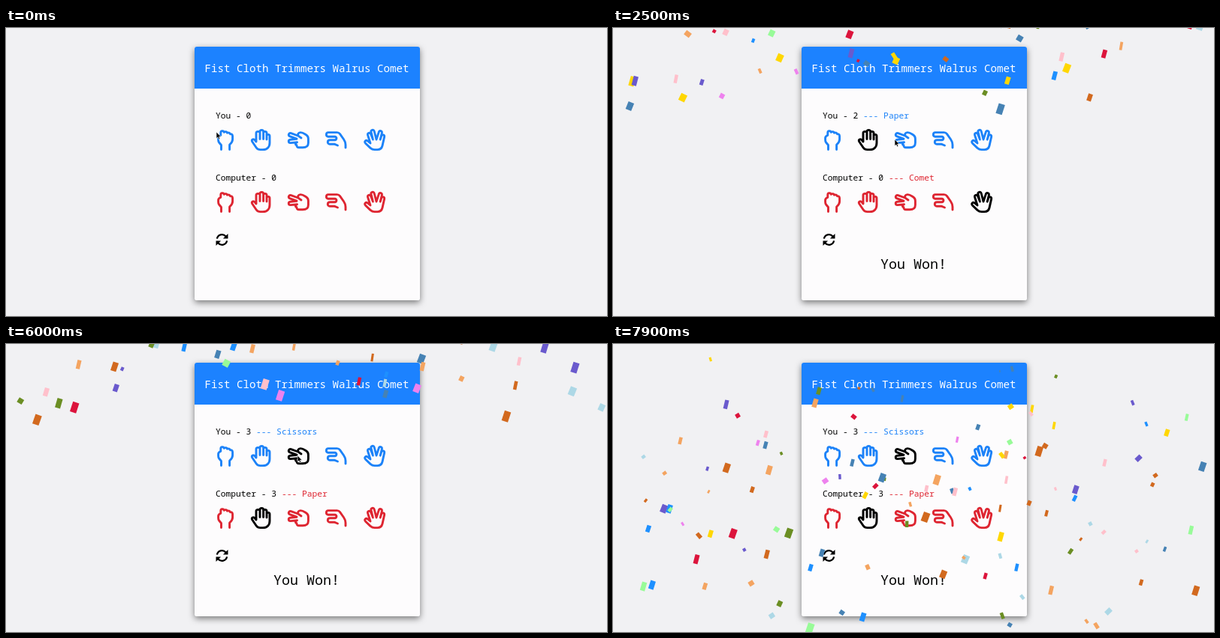
These frames come from a looping animation (800x385 px, 8000 ms). An HTML page with a canvas:

```html
<!DOCTYPE html>
<html lang="en">
<head>
<meta charset="utf-8">
<title>Hand game</title>
<style>
  html, body { margin: 0; width: 100%; height: 100%; overflow: hidden; background: #f1f1f3; }
  #card {
    position: absolute; left: 250.5px; top: 24.5px; width: 300px; height: 339.5px;
    border-radius: 3px; overflow: hidden; background: #fdfcfd;
  }
  #shadow {
    position: absolute; left: 250.5px; top: 24.5px; width: 300px; height: 339.5px;
    border-radius: 3px; box-shadow: 0 3px 8px rgba(0, 0, 0, .5);
  }
  #head { height: 56.5px; background: #1c82ff; }
  svg, canvas { position: absolute; left: 0; top: 0; width: 800px; height: 385px; }
  text { font: 11.28px "Noto Sans Mono", "DejaVu Sans Mono", monospace; white-space: pre; }
  #title { font-size: 14.17px; fill: #fff; text-anchor: middle; font-weight: 500; }
  #result { font-size: 18.35px; text-anchor: middle; }
  .icon { fill: none; stroke-width: 2.9; stroke-linecap: round; stroke-linejoin: round; }
</style>
</head>
<body>
<div id="shadow"></div>
<div id="card"><div id="head"></div></div>
<svg id="game" viewBox="0 0 800 385">
  <text id="title" x="400.5" y="58.5">Fist Cloth Trimmers Walrus Comet</text>
  <g id="rows"></g>
  <g id="refresh" transform="translate(287.5 283)">
    <g fill="none" stroke="#000" stroke-width="2.3">
      <path d="M-6.6 -1.4 A6.6 6.6 0 0 1 5 -4.4"/>
      <path d="M6.6 1.4 A6.6 6.6 0 0 1 -5 4.4"/>
    </g>
    <path d="M8 -8 V-1.4 H1.4 Z M-8 8 V1.4 H-1.4 Z"/>
  </g>
  <text id="result" x="400" y="322"></text>
</svg>
<canvas id="confetti" width="800" height="385"></canvas>
<svg viewBox="0 0 800 385">
  <circle id="ring" cx="390" cy="150" r="13" fill="none" stroke="#000" stroke-width="1.5"/>
  <path id="cursor" d="M0 0 V8.6 L2 6.9 L3.3 9.8 L4.8 9.1 L3.5 6.3 H6.1 Z" stroke="#fff" stroke-width=".6"/>
</svg>
<script>
const LOOP = 8000, STEP = 100, W = 800, H = 385;
const BLUE = '#1c82f8', RED = '#de2531';
const $ = id => document.getElementById(id);

const hands = [
  { name: 'Rock', x: 281, y: 136, d: 'M5.5 26.5 V20.5 L2.6 17 C1.8 16 1.6 15 1.6 13.5 V11 C1.6 9.5 2.5 8.3 4.8 7.5 V4 C4.8 1 8.8 .8 9.2 3.4 C10.8 2 13 2.6 13.5 4.2 C15 3.4 17 4 17.4 5.8 C19 5.4 20.6 6.4 20.6 8.4 V13 C20.6 16 19.5 17.5 16.6 20 V26.5' },
  { name: 'Paper', x: 326, y: 135, d: 'M7 17 L5 14.6 C3.3 12.6 .3 14.4 1.8 17 L7.2 25 C8.6 27 10.4 27.6 12.4 27.6 H16 C21.5 27.6 25 24 25 18.5 V9.5 C25 6.6 21 6.6 21 9.5 V5.5 C21 2.6 16.6 2.6 16.6 5.5 V3.6 C16.6 .6 12 .6 12 3.6 V5.5 C12 2.6 7 2.6 7 5.5 Z M12 5 V13.5 M16.6 5 V13.5 M21 9 V14' },
  { name: 'Scissors', x: 375, y: 138, d: 'M13.5 6 L4.4 2.6 C1.3 1.6 0 5.6 3 6.8 L12 10.2 L3.6 11.2 C.2 11.6 .6 15.9 4 15.6 L12.5 14.8 C9.8 15.4 10 18.2 12 18.6 C11.6 20.8 13 21.8 15 21.8 H20 C25 21.8 27.4 19.5 27.4 15.5 V10 C27.4 7.6 26.4 6 24.4 4.8 C22 3.2 20 1.6 17 1.6 C14 1.6 12.5 4.6 14.6 6.6 L18 9' },
  { name: 'Lizard', x: 425, y: 138, d: 'M27 22 V18 C27 15 26 13 24.5 10.8 L19.5 3.6 C18.5 2.2 17.5 1.6 15.6 1.6 H4 C.6 1.6 .6 6.6 3.4 7.2 H12.5 C16 7.2 15.5 11.6 12.4 11.8 H6.5 C2.2 11.8 2.4 17.2 6 17.2 H12 L16.5 19' },
  { name: 'Comet', x: 477, y: 135, d: 'M8 19 L4.4 16 C2 14 -.6 17 1.6 19.2 L8 25.4 C9.8 27 11.4 27.6 13.6 27.6 H17.5 C21 27.6 23.2 25.8 24 22.4 L26.6 10.6 C27.2 7.6 23.4 6.8 22.6 9.6 L21.2 14.2 L23.4 5.4 C24.2 2.2 20 1.4 19.2 4.4 L16 14 L13.2 3 C12.4 0 8.2 1.2 9 4.2 L11.4 14 L8.6 6.8 C7.6 4 3.8 5.2 4.6 8.2 Z' }
];

// Each round: start time, both picks, both scores, outcome.
const rounds = [
  { at: 0, you: -1, cpu: -1, score: [0, 0], text: '' },
  { at: 300, you: 0, cpu: 3, score: [1, 0], text: 'You Won!', end: 2000 },
  { at: 2000, you: 1, cpu: 4, score: [2, 0], text: 'You Won!', end: 3200 },
  { at: 3200, you: 2, cpu: 4, score: [2, 1], text: 'You Lost!' },
  { at: 3600, you: 2, cpu: 0, score: [2, 2], text: 'You Lost!' },
  { at: 4700, you: 2, cpu: 4, score: [2, 3], text: 'You Lost!' },
  { at: 5600, you: 2, cpu: 1, score: [3, 3], text: 'You Won!', end: 7600 }
];
const clicks = [3500, 4600, 5500];

// Cursor stops: time, x, y.
const stops = [[0, 280, 139], [200, 290, 147], [700, 290, 147], [1400, 338, 153],
  [2100, 338, 153], [2500, 375, 149], [3000, 388, 149], [6500, 388, 149]];

function add(parent, tag, attrs) {
  const el = document.createElementNS('http://www.w3.org/2000/svg', tag);
  for (const k in attrs) el.setAttribute(k, attrs[k]);
  return parent.appendChild(el);
}

function makeRow(label, color, dy) {
  const text = add($('rows'), 'text', { x: 279, y: 121.3 + dy });
  const score = add(text, 'tspan', {});
  const pick = add(text, 'tspan', { fill: color });
  const icons = hands.map(h => add($('rows'), 'path', {
    class: 'icon', d: h.d, transform: `translate(${h.x} ${h.y + dy})`
  }));
  return (points, chosen) => {
    score.textContent = `${label} - ${points}`;
    pick.textContent = chosen < 0 ? '' : ` --- ${hands[chosen].name}`;
    icons.forEach((el, i) => el.setAttribute('stroke', i === chosen ? '#000' : color));
  };
}
const showYou = makeRow('You', BLUE, 0);
const showCpu = makeRow('Computer', RED, 83);

function seeded(seed) {
  return () => {
    seed = (seed + 0x6D2B79F5) | 0;
    let v = Math.imul(seed ^ (seed >>> 15), 1 | seed);
    v = (v + Math.imul(v ^ (v >>> 7), 61 | v)) ^ v;
    return ((v ^ (v >>> 14)) >>> 0) / 4294967296;
  };
}

const colors = ['dodgerblue', 'olivedrab', 'gold', 'pink', 'slateblue', 'lightblue',
  'violet', 'palegreen', 'steelblue', 'sandybrown', 'chocolate', 'crimson'];
const SCALE = .6, RATE = .045, COUNT = 150;

function makePieces(seed) {
  const rnd = seeded(seed);
  return Array.from({ length: COUNT }, () => ({
    color: colors[Math.floor(rnd() * colors.length)],
    x: rnd() * W,
    y: rnd() * H - H,
    size: rnd() * 10 + 5,
    spin: rnd() * .07 + .05
  }));
}
rounds.forEach((r, i) => { if (r.end) r.pieces = makePieces(i * 97 + 5); });

const ctx = $('confetti').getContext('2d');

const fall = (p, n) => p.y + SCALE * .5 * (100 * Math.sin(.01 * n) + (p.size + 2) * n);

function drawConfetti(round, t) {
  ctx.clearRect(0, 0, W, H);
  if (!round.pieces) return;
  const n = (t - round.at) * RATE;
  const last = (round.end - round.at) * RATE;
  for (const p of round.pieces) {
    if (n > last && fall(p, last) < -9) continue;
    const y = fall(p, n);
    if (y < -20 || y > H + 20) continue;
    const tilt = Math.sin(p.spin * n / .75) * 15 * SCALE;
    const size = p.size * SCALE;
    const x = p.x + SCALE * 100 * (1 - Math.cos(.01 * n)) + tilt;
    ctx.strokeStyle = p.color;
    ctx.lineWidth = size;
    ctx.beginPath();
    ctx.moveTo(x + size / 2, y);
    ctx.lineTo(x, y + tilt + size / 2);
    ctx.stroke();
  }
}

function moveCursor(t) {
  const i = stops.findIndex(s => s[0] > t);
  $('cursor').style.display = i < 0 ? 'none' : '';
  if (i < 0) return;
  const [a, b] = [stops[i - 1], stops[i]];
  const u = (t - a[0]) / (b[0] - a[0]);
  const k = u * u * (3 - 2 * u);
  const at = j => a[j] + (b[j] - a[j]) * k;
  $('cursor').setAttribute('transform', `translate(${at(1)} ${at(2)})`);
}

function draw(t) {
  const round = rounds.filter(r => r.at <= t).pop();
  showYou(round.score[0], round.you);
  showCpu(round.score[1], round.cpu);
  $('result').textContent = round.text;
  $('ring').style.display = clicks.includes(t) ? '' : 'none';
  drawConfetti(round, t);
  moveCursor(t);
}

const begin = performance.now();
let shown = -1;
function tick() {
  const t = Math.floor(((performance.now() - begin) % LOOP) / STEP) * STEP;
  if (t !== shown) draw(shown = t);
  requestAnimationFrame(tick);
}
tick();
</script>
</body>
</html>
```
